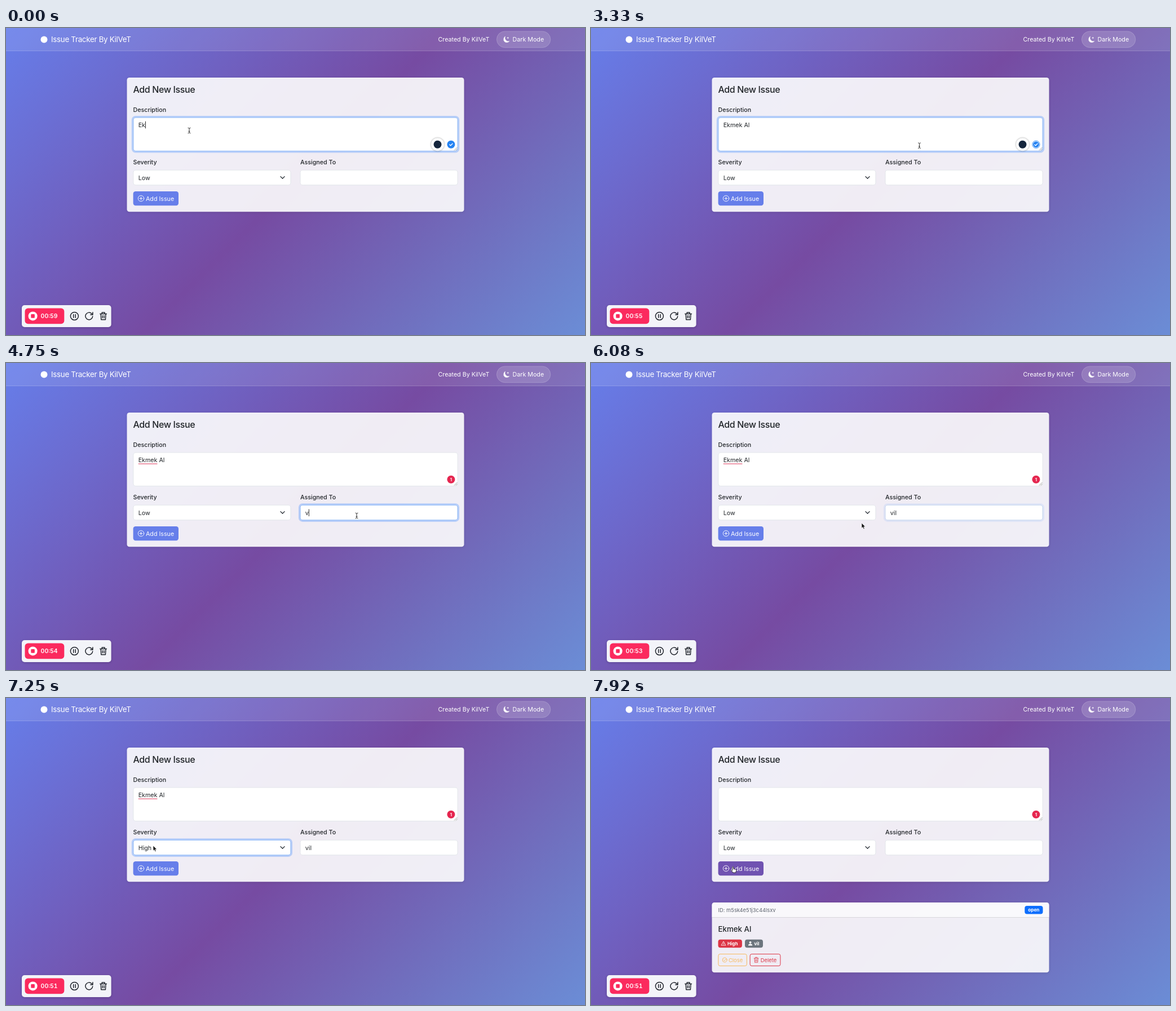
An HTML page for the animation above (8000 ms loop, 1027 by 545 pixels).

```html
<!DOCTYPE html>
<html lang="en">
<head>
<meta charset="utf-8">
<title>Issue form</title>
<style>
html, body { margin: 0; width: 100%; height: 100%; overflow: hidden; }
svg { display: block; width: 100%; height: 100%; background: linear-gradient(135deg, #667eea 0%, #764ba2 50%, #6b8dd6 100%); }
text { font: 400 10.7px Inter, "Open Sans", sans-serif; fill: #212529; white-space: pre; }
.label { font-weight: 500; }
.light { fill: #fff; }
.brand { font-size: 13.3px; letter-spacing: -.02em; }
.heading { font-size: 16px; font-weight: 500; letter-spacing: -.024em; }
.title { font-size: 13.3px; font-weight: 500; }
.small { font-size: 9.4px; fill: #5f6570; }
.badge { font-size: 8.2px; font-weight: 700; fill: #fff; }
.timer { font-size: 10.5px; font-weight: 600; fill: #fff; font-variant-numeric: tabular-nums; }
.field { fill: #fff; stroke: #dee2e6; stroke-width: .8; }
.ring rect { fill: none; stroke: #0d6efd; stroke-opacity: .25; stroke-width: 2.8; }
.ring rect + rect { stroke: #86b7fe; stroke-opacity: 1; stroke-width: .9; }
.line { fill: none; stroke-linecap: round; stroke-linejoin: round; }
.card { fill: #fff; fill-opacity: .9; filter: drop-shadow(0 1px 2px #0002); }
</style>
</head>
<body>
<svg viewBox="0 0 1027 545" preserveAspectRatio="none">
  <!-- navigation bar -->
  <rect width="1027" height="41" fill="#fff" fill-opacity=".1"/>
  <path d="M0 40.6H1027" stroke="#fff" stroke-opacity=".22" stroke-width=".8"/>
  <circle class="light" cx="67.5" cy="20.5" r="6"/>
  <text class="brand light" x="80" y="25.2">Issue Tracker By KilVeT</text>
  <text class="light" x="766.5" y="24.4">Created By KilVeT</text>
  <rect x="870.4" y="5.9" width="95.4" height="28.8" rx="14.4" fill="#fff" fill-opacity=".14" stroke="#fff" stroke-opacity=".25" stroke-width=".8"/>
  <path class="light" d="M886.2 14.6a5.8 5.8 0 1 0 7.2 8.1a5.6 5.6 0 0 1-7.2-8.1z"/>
  <path class="light" d="M890.2 15.4l.6 1.5 1.5.6-1.5.6-.6 1.5-.6-1.5-1.5-.6 1.5-.6z"/>
  <text class="light" x="898.5" y="24.4">Dark Mode</text>

  <!-- form -->
  <rect class="card" x="214.5" y="88" width="598" height="238.3" rx="4.4"/>
  <text class="heading" x="225.5" y="115.3">Add New Issue</text>
  <text class="label" x="225.5" y="149">Description</text>
  <text class="label" x="225.5" y="242.4">Severity</text>
  <text class="label" x="522" y="242.4">Assigned To</text>
  <rect class="field" x="225.9" y="159" width="575.2" height="59.4" rx="4.2"/>
  <rect class="field" x="225.9" y="252.3" width="279" height="26.5" rx="4.2"/>
  <rect class="field" x="522" y="252.3" width="279" height="26.5" rx="4.2"/>
  <g id="rings"></g>
  <path class="line" d="M795.2 217.2l5-5M798 217.2l2.2-2.2" stroke="#777" stroke-width=".7"/>
  <path class="line" d="M487 263.8l3.5 3.5 3.5-3.5" stroke="#343a40" stroke-width="1.4"/>
  <text id="description" x="234.7" y="176"></text>
  <text id="severity" x="234.7" y="269.8"></text>
  <text id="assignee" x="530.8" y="269.8"></text>
  <path id="underline" stroke="#dc3558" stroke-width="1.2"/>
  <rect id="caret" width=".9" height="12.6" fill="#111"/>

  <g id="helper">
    <circle cx="765.5" cy="206.7" r="11.5" fill="#fff" style="filter:drop-shadow(0 .5px 1.5px #0006)"/>
    <circle cx="765.5" cy="206.7" r="7" fill="#14253c"/>
  </g>
  <g id="checked">
    <circle id="checkRing" cx="789.4" cy="206.8" r="6.6" fill="none" stroke="#2583f2" stroke-width=".9"/>
    <circle id="checkDisc" cx="789.4" cy="206.8" fill="#2583f2"/>
    <path class="line" d="M786.8 207l1.8 1.8 3.4-3.6" stroke="#fff" stroke-width="1.3"/>
  </g>
  <g id="warned">
    <circle cx="789.4" cy="206.8" r="7" fill="#e5264f"/>
    <text class="badge" x="789.3" y="209.6" text-anchor="middle" style="font-size:7.6px">1</text>
  </g>

  <rect id="button" x="225.6" y="290" width="80.4" height="25.2" rx="4.2"/>
  <g class="line" stroke="#fff" stroke-width=".9"><circle cx="239.5" cy="302.6" r="5.2"/><path d="M236.9 302.6h5.2M239.5 300v5.2"/></g>
  <text class="light" x="248" y="306.5">Add Issue</text>

  <!-- added issue -->
  <g id="issue">
    <rect class="card" x="214.5" y="363" width="598" height="124.3" rx="4.4"/>
    <path d="M214.5 389.5V367.4a4.4 4.4 0 0 1 4.4-4.4H808.1a4.4 4.4 0 0 1 4.4 4.4V389.5z" fill="#fff" fill-opacity=".65"/>
    <path d="M214.5 389.5h598" stroke="#000" stroke-opacity=".15" stroke-width=".8"/>
    <text class="small" x="225.5" y="379.9">ID: m5sk4e51j3c44lsxv</text>
    <rect x="769.3" y="369" width="32.2" height="14.4" rx="4" fill="#0d6efd"/>
    <text class="badge" x="785.4" y="379.4" text-anchor="middle">open</text>
    <text class="title" x="225.5" y="414.7">Ekmek Al</text>
    <rect x="225.5" y="428.8" width="42.4" height="14.4" rx="4" fill="#dc3545"/>
    <path class="line" d="M235.2 432.3l3.8 6.8h-7.6zM235.2 434.8v1.8M235.2 437.8v.1" stroke="#fff" stroke-width=".8"/>
    <text class="badge" x="242" y="439.1">High</text>
    <rect x="273" y="428.8" width="32" height="14.4" rx="4" fill="#6c757d"/>
    <circle class="light" cx="282.6" cy="434" r="1.9"/>
    <path class="light" d="M279 439.4q0-2.8 3.6-2.8t3.6 2.8z"/>
    <text class="badge" x="289.2" y="439.1">vil</text>
    <rect x="225.9" y="454.6" width="50.4" height="21" rx="3" fill="none" stroke="#f6b95c"/>
    <g class="line" stroke="#f6b95c" stroke-width=".9"><circle cx="237.2" cy="465" r="4"/><path d="M235.4 465l1.4 1.5 3-3.4"/></g>
    <text class="small" x="244" y="468.5" style="fill:#f6b95c">Close</text>
    <rect x="282.1" y="454.6" width="53.8" height="21" rx="3" fill="none" stroke="#dc3545"/>
    <path class="line" d="M289.2 462h7.8M291.6 461.8v-1.4h3v1.4M290 462.2l.5 7.2h5.2l.5-7.2M292.1 464v3.6M294.1 464v3.6" stroke="#dc3545" stroke-width=".8"/>
    <text class="small" x="300.8" y="468.5" style="fill:#dc3545">Delete</text>
  </g>

  <!-- recorder -->
  <rect x="28" y="492" width="158.6" height="39" rx="5" fill="#f3f4f9" style="filter:drop-shadow(0 1px 2px #0003)"/>
  <rect x="33.5" y="497.6" width="69.8" height="27.6" rx="5.5" fill="#fb2a5e"/>
  <circle class="light" cx="47.6" cy="511.4" r="8"/>
  <rect x="44.3" y="508.1" width="6.6" height="6.6" rx="1.2" fill="#fb2a5e"/>
  <text class="timer" id="timer" x="61.6" y="515.2"></text>
  <g class="line" stroke="#20242c" stroke-width="1.5">
    <circle cx="121.4" cy="511.4" r="7"/><path d="M119.7 508.6v5.6M123.2 508.6v5.6"/>
    <path d="M153.7 511.8a6.4 6.4 0 1 1-2-5l2 1.9M153.9 504.8v4.1h-4.1"/>
    <path d="M166.8 507.4h11.6M170.2 507.2v-2.2h4.8v2.2M168.2 507.6l.6 10.2h7.6l.6-10.2M171.2 510.4v4.4M174 510.4v4.4"/>
  </g>

  <!-- pointers, hot spot at 0 0 -->
  <g id="pointer">
    <g data-kind="beam" class="line"><path d="M-2-4.8Q0-4.6 0-3.4V3.4Q0 4.6-2 4.8M2-4.8Q0-4.6 0-3.4M0 3.4Q0 4.6 2 4.8M-1 1.5H1" stroke="#fff" stroke-width="2" opacity=".7"/><path d="M-2-4.8Q0-4.6 0-3.4V3.4Q0 4.6-2 4.8M2-4.8Q0-4.6 0-3.4M0 3.4Q0 4.6 2 4.8M-1 1.5H1" stroke="#222" stroke-width=".9"/></g>
    <path data-kind="arrow" d="M0 0V9.3L2.1 7.4 3.6 10.7 5.2 10 3.8 6.8H6.6z" fill="#111" stroke="#fff" stroke-width=".7"/>
    <path data-kind="hand" d="M-1 0Q0-1 .8 0V3.4L4.8 4.3Q6 4.8 5.6 6.8L4.6 10H0L-3 6.4Q-3.2 5-1 6z" fill="#fff" stroke="#111" stroke-width=".8"/>
  </g>
</svg>
<script>
const LOOP = 8000, STEP = 1000 / 12;
const el = id => document.getElementById(id);

// Step tables: [start time, value]
const description = [[0, 'Ek'], [166, 'Ekm'], [500, 'Ekme'], [1500, 'Ekmek'], [1750, 'Ekmek '], [2250, 'Ekmek A'], [2500, 'Ekmek Al'], [7910, '']];
const assignee = [[0, ''], [4660, 'v'], [5080, 'vi'], [5500, 'vil'], [7910, '']];
const severity = [[0, 'Low'], [7250, 'High'], [7910, 'Low']];
const seconds = [[0, 59], [250, 58], [1250, 57], [2250, 56], [3250, 55], [4250, 54], [5500, 53], [6250, 52], [7250, 51]];
const check = [[0, 'done'], [166, 'busy'], [750, 'done'], [916, 'busy'], [2000, 'done'], [2250, 'busy'], [2750, 'done'], [2916, 'busy'], [3750, 'done'], [4166, 'warned']];
const buttonFill = [[0, '#667eea'], [6250, '#6c68cd'], [6330, '#7154b3'], [6580, '#6c68cd'], [6660, '#6973dc'], [6750, '#667eea'], [7830, '#5460c8'], [7910, '#7052b1']];
const kind = [[0, 'beam'], [166, ''], [2916, 'beam'], [3410, 'arrow'], [3660, 'beam'], [5910, 'arrow'], [6250, 'hand'], [6500, 'arrow'], [7910, 'hand']];
const caretFocus = [[0, 'description'], [3660, 'assignee'], [5910, '']];

// Tracks: [time, values...], linear in between
const path = [[0, 325, 182], [2910, 325, 182], [3330, 643, 215], [3500, 638, 238], [3750, 622, 271], [5800, 622, 271], [6000, 480, 284], [6250, 276, 300], [6420, 264, 298], [6580, 261, 262], [7660, 261, 262], [7750, 253, 292], [7830, 251, 298], [7910, 252, 300]];
const focus = {
  description: { box: [225.9, 159, 575.2, 59.4], track: [[0, 1], [3580, 1], [3830, 0]] },
  assignee: { box: [522, 252.3, 279, 26.5], track: [[3580, 0], [3830, 1], [5830, 1], [6080, 0]] },
  severity: { box: [225.9, 252.3, 279, 26.5], track: [[6580, 0], [6750, .7], [7240, .7], [7250, 1], [7660, 1], [7830, .4], [7910, 0]] }
};

const stepAt = (table, t) => table.findLast(row => row[0] <= t);
const valueAt = (table, t) => stepAt(table, t)[1];

function tween(track, t) {
  const next = track.findIndex(row => row[0] > t);
  if (next < 0) return track.at(-1).slice(1);
  if (next === 0) return track[0].slice(1);
  const a = track[next - 1], b = track[next], k = (t - a[0]) / (b[0] - a[0]);
  return a.slice(1).map((v, i) => v + (b[i + 1] - v) * k);
}

const show = (node, on) => { node.style.display = on ? '' : 'none'; };

function set(node, attrs) {
  for (const name in attrs) node.setAttribute(name, attrs[name]);
}

for (const item of Object.values(focus)) {
  const [x, y, w, h] = item.box;
  const outline = (pad, r) => `<rect x="${x - pad}" y="${y - pad}" width="${w + 2 * pad}" height="${h + 2 * pad}" rx="${r}"/>`;
  item.node = document.createElementNS('http://www.w3.org/2000/svg', 'g');
  item.node.setAttribute('class', 'ring');
  item.node.innerHTML = outline(1.7, 5.6) + outline(0, 4.2);
  el('rings').append(item.node);
}

function drawCaret(t) {
  const [since, id] = stepAt(caretFocus, t);
  const lastKey = id ? Math.max(since, stepAt(id === 'assignee' ? assignee : description, t)[0]) : 0;
  const on = id && (t - lastKey) % 1000 < 500;
  show(el('caret'), on);
  if (!on) return;
  const field = el(id);
  set(el('caret'), { x: +field.getAttribute('x') + field.getComputedTextLength(), y: field.getAttribute('y') - 10.3 });
}

function draw(t) {
  el('description').textContent = valueAt(description, t);
  el('assignee').textContent = valueAt(assignee, t);
  el('severity').textContent = valueAt(severity, t);
  el('timer').textContent = '00:' + valueAt(seconds, t);
  set(el('button'), { fill: valueAt(buttonFill, t) });
  for (const { node, track } of Object.values(focus)) node.style.opacity = tween(track, t)[0];
  drawCaret(t);

  const state = valueAt(check, t), text = el('description');
  const underlined = state === 'warned' && text.textContent !== '';
  show(el('helper'), t < 3740);
  show(el('checked'), state !== 'warned');
  show(el('warned'), state === 'warned');
  show(el('checkRing'), state === 'busy');
  set(el('checkDisc'), { r: state === 'busy' ? 5.4 : 7 });
  show(el('underline'), underlined);
  if (underlined) set(el('underline'), { d: `M234.7 179h${text.getSubStringLength(0, 5)}` });
  show(el('issue'), t >= 7910);

  const [x, y] = tween(path, t), shape = valueAt(kind, t);
  set(el('pointer'), { transform: `translate(${x} ${y})` });
  for (const node of el('pointer').children) show(node, node.dataset.kind === shape);
}

function tick() {
  const t = performance.now() % LOOP;
  draw(Math.floor((t + 2) / STEP) * STEP);
  requestAnimationFrame(tick);
}
tick();
</script>
</body>
</html>
```
